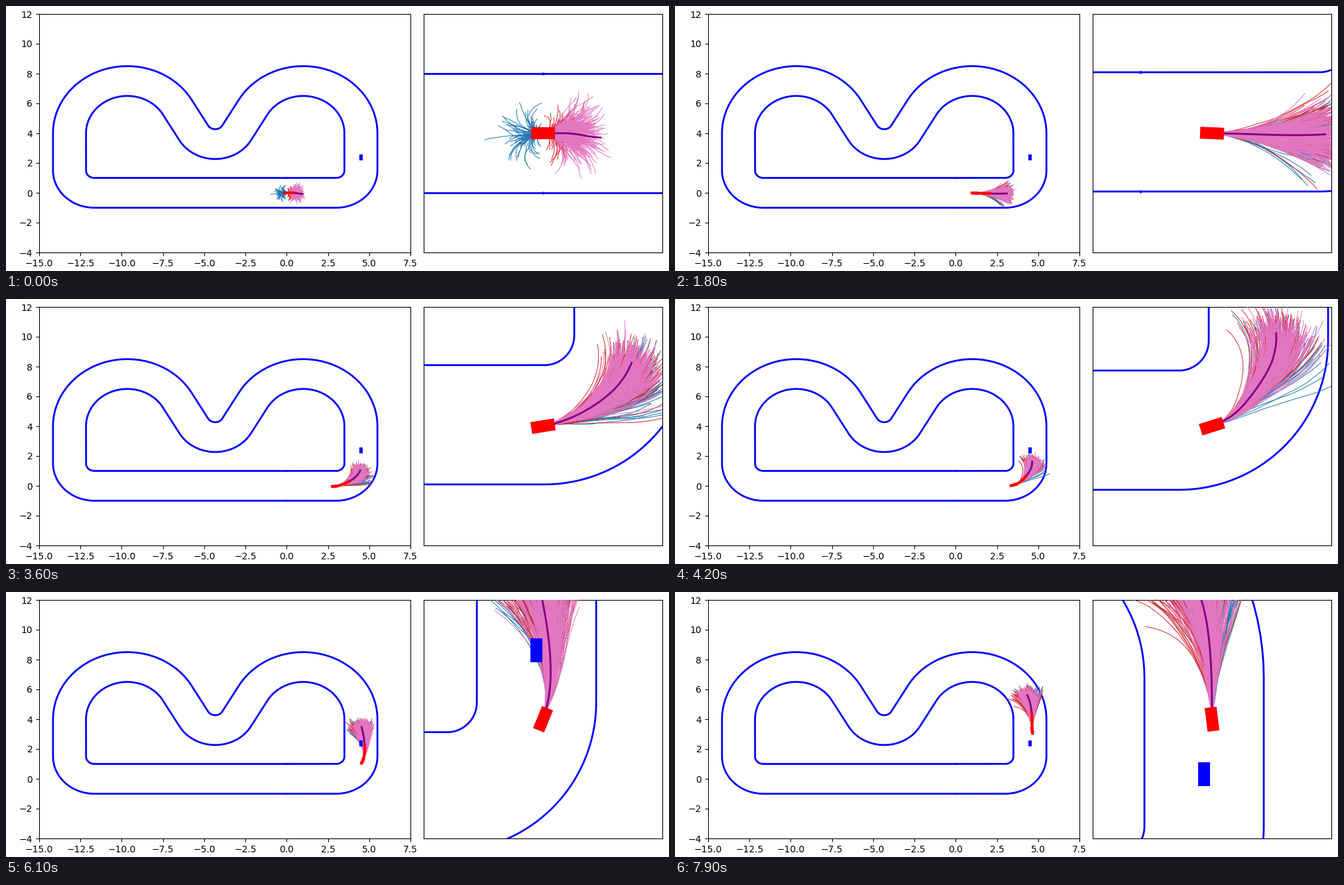
Animation of 1000x400 px, one loop 8 s. Source, as a matplotlib script:

```python
import numpy as np
import matplotlib.pyplot as plt
from matplotlib.animation import FuncAnimation
from matplotlib.collections import LineCollection
from matplotlib.patches import Polygon, Rectangle

FRAMES, STEP = 80, 100
CAR = np.array([[-.2, -.1], [.2, -.1], [.2, .1], [-.2, .1]])
OBSTACLE = (4.5, 2.378)
GROUPS = [("tab:blue", 90), ("tab:red", 150), ("tab:pink", 250)]

# time, x, y, heading, speed, horizon length, plan headings at 4 even points,
# steering bias of the blue and the red samples
KEYS = np.array([
    [0.0, 0, 0, 0, 0, .97, 0, 0, -11, -5, 0, 0],
    [0.9, .36, 0, -1, .8, 1.5, 0, 0, 2, 3, -.1, 0],
    [1.8, 1.2, -.022, -2.5, .98, 1.9, -1, -2, -1, 3, -.12, .04],
    [2.9, 2.267, -.02, -1, 1, 1.78, 0, 0, 18, 38, -.3, -.06],
    [4.2, 3.555, .067, 17.5, .95, 2.0, 22, 50, 60, 90, -.12, 0],
    [5.3, 4.278, .644, 49.6, .82, 2.0, 55, 85, 92, 92, 0, .08],
    [7.0, 4.756, 2.1, 88.5, 1.15, 2.6, 92, 96, 105, 115, .15, 0],
    [7.9, 4.633, 3.3, 97, 1.4, 2.35, 90, 92, 98, 112, -.2, .16],
])
T = KEYS[:, 0]


def lane(offset):
    """Track wall at a signed distance to the right of the centre line."""
    pts = []

    def arc(cx, cy, r, a0, a1):
        a = np.radians(np.linspace(a0, a1, 50))
        pts.append(np.column_stack([cx + r * np.cos(a), cy + r * np.sin(a)]))

    dip = 5 * np.sqrt(3) / 2
    left = 1 - 2 * (dip + 1)
    pts.append(np.array([[0, -offset]]))
    arc(3, 1.5, 1.5 + offset, -90, 0)
    arc(1, 4, 3.5 + offset, 0, 150)
    arc(-dip, 6.5 - np.sqrt(3), 1.5 - offset, -30, -150)
    arc(left, 4, 3.5 + offset, 30, 180)
    arc(left - 2, 1.5, 1.5 + offset, 180, 270)
    pts.append(np.array([[0, -offset]]))
    return np.vstack(pts)


def pose(t):
    """Hermite curve through the key poses, tangent to the heading."""
    i = min(np.searchsorted(T, t, side="right") - 1, len(T) - 2)
    a, b = KEYS[i], KEYS[i + 1]
    dt = b[0] - a[0]
    u = (t - a[0]) / dt

    def tangent(k):
        h = np.radians(k[3])
        return k[4] * dt * np.array([np.cos(h), np.sin(h)])

    p = ((2 * u**3 - 3 * u**2 + 1) * a[1:3] + (u**3 - 2 * u**2 + u) * tangent(a)
         + (3 * u**2 - 2 * u**3) * b[1:3] + (u**3 - u**2) * tangent(b))
    return p, np.radians(np.interp(t, T, KEYS[:, 3]))


def walk(start, heading, length):
    """Paths from headings (n, m) and total lengths (n,)."""
    ds = (length / heading.shape[1])[:, None]
    steps = np.stack([ds * np.cos(heading), ds * np.sin(heading)], axis=2)
    paths = np.zeros((heading.shape[0], heading.shape[1] + 1, 2))
    paths[:, 1:] = np.cumsum(steps, axis=1)
    return paths + start


def samples(rng, group, n, start, plan, length, bias, rest):
    m = len(plan)
    u = (np.arange(m) + 1) / m
    spread = (.27, .25, .2)[group] * (1 - rest) + (1.3, .95, .6)[group] * rest
    turn = rng.normal(bias, spread, (n, 1)) * u
    wiggle = np.cumsum(rng.normal(0, .035 + .07 * rest, (n, m)), axis=1)
    moving = length * rng.normal(1.07, .09, n)
    idle = rng.normal((-.38, .45, .8)[group], (.24, .18, .16)[group], n)
    return walk(start, plan + turn + wiggle, moving * (1 - rest) + idle * rest)


fig = plt.figure(figsize=(10, 4), dpi=100)
main = fig.add_axes([.05, .07, .56, .9], xlim=(-15, 7.5), ylim=(-4, 12))
zoom = fig.add_axes([.63, .07, .36, .9], xticks=[], yticks=[])
main.set_xticks(np.arange(-15, 7.6, 2.5))
main.set_yticks(range(-4, 13, 2))

walls = [lane(1), lane(-1)]
bundles, plans, cars = [], [], []
for ax in (main, zoom):
    for wall in walls:
        ax.plot(*wall.T, color="blue", lw=2, zorder=2)
        y = wall[0, 1]
        ax.plot([0, 0], [y - .022, y + .022], color="blue", lw=2,
                solid_capstyle="butt", zorder=2)
    row = []
    for z, (color, _) in enumerate(GROUPS):
        lines = LineCollection([], colors=color, linewidths=.7, zorder=3 + z)
        row.append(ax.add_collection(lines, autolim=False))
    bundles.append(row)
    plans.append(ax.plot([], [], color="purple", lw=2, zorder=7)[0])
    cars.append(ax.add_patch(Polygon(CAR, fc="red", ec="none", zorder=9)))
    ax.add_patch(Rectangle((OBSTACLE[0] - .1, OBSTACLE[1] - .2), .2, .4,
                           fc="blue", ec="none", zorder=10))
trail, = main.plot([], [], color="red", lw=3, solid_capstyle="butt", zorder=8)


def update(i):
    t = i * STEP / 1000
    rng = np.random.default_rng(100 + i)
    pos, head = pose(t)
    row = [np.interp(t, T, KEYS[:, c]) for c in range(5, KEYS.shape[1])]
    length, biases = row[0], (row[5], row[6], 0)
    u = np.linspace(0, 1, 18)
    plan = np.radians(np.interp(u, np.linspace(0, 1, 4), row[1:5]))
    rest = max(0, 1 - t / .6)

    best = walk(pos, plan[None], np.array([length]))[0]
    for g, (_, n) in enumerate(GROUPS):
        paths = samples(rng, g, n, pos, plan, length, biases[g], rest)
        for view in bundles:
            view[g].set_segments(paths)
    c, s = np.cos(head), np.sin(head)
    body = CAR @ np.array([[c, s], [-s, c]]) + pos
    for line, car in zip(plans, cars):
        line.set_data(*best.T)
        car.set_xy(body)

    old, turn = pose(max(0, t - STEP / 1000))
    rear = old - .2 * np.array([np.cos(turn), np.sin(turn)])
    trail.set_data(*np.vstack([rear, best[:10]]).T)
    zoom.set_xlim(pos[0] - 2, pos[0] + 2)
    zoom.set_ylim(pos[1] - 2, pos[1] + 2)
    return []


anim = FuncAnimation(fig, update, frames=FRAMES, interval=STEP,
                     repeat=True, repeat_delay=0, blit=False)
plt.show()
```
